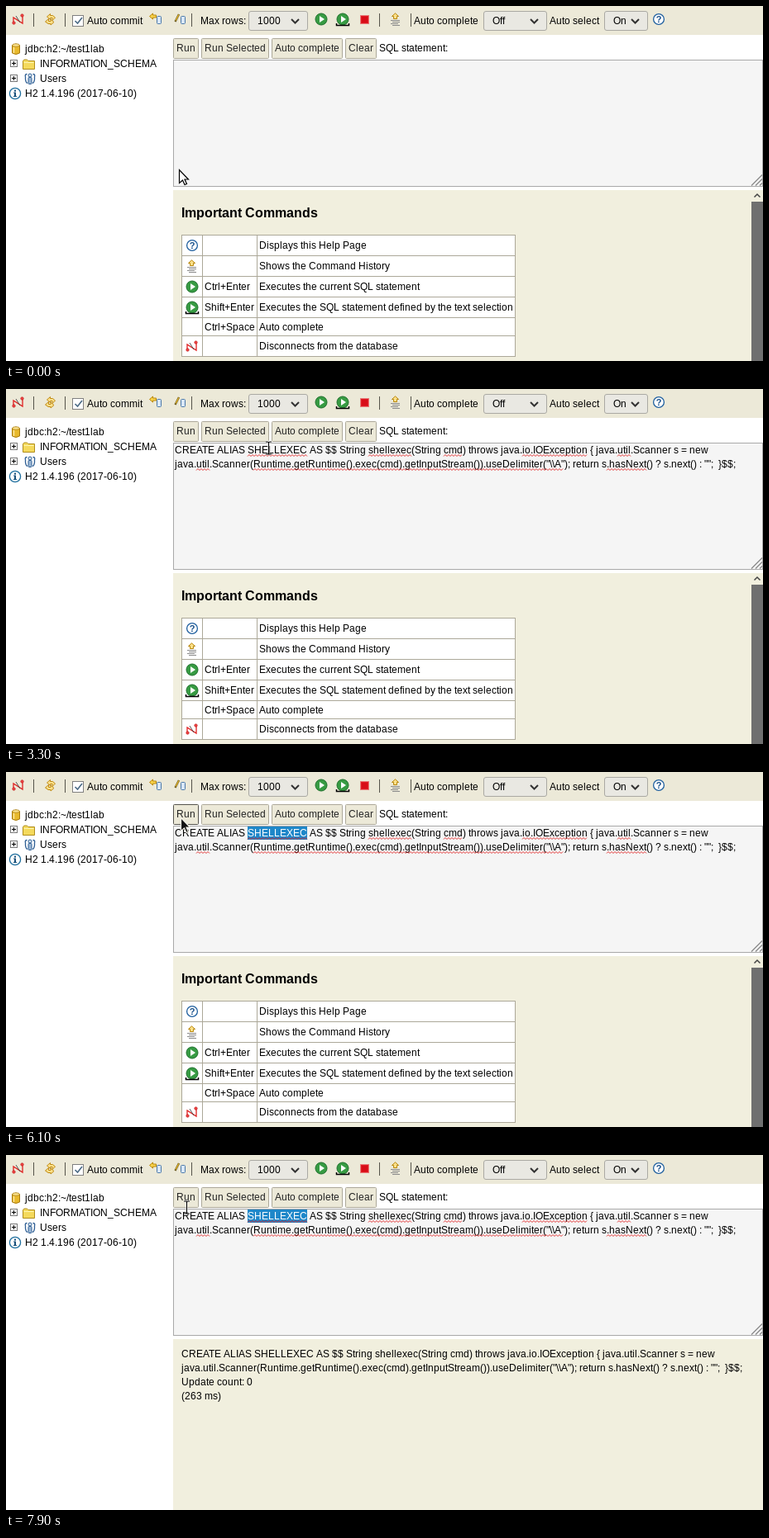
Animation of 915 by 430 pixels, one loop 8 s. Source, as an HTML page:

```html
<!DOCTYPE html>
<html lang="en">
<head>
<meta charset="utf-8">
<title>SQL console</title>
<style>
html, body { margin: 0; width: 100%; height: 100%; overflow: hidden; background: #fff; }
svg { display: block; }
text { white-space: pre; }
</style>
</head>
<body>
<svg id="stage" width="915" height="430" viewBox="0 0 915 430"></svg>
<script>
const LOOP = 8000, STEP = 100;
const BAR = '#ece9d8', PANEL = '#f1efde', EDGE = '#aca899', GOLD = '#e8b92c', BLUE = '#2f5f94';
const FAMILY = "'Liberation Sans', Arial, sans-serif";
const BODY = `12px ${FAMILY}`, TITLE = `bold 16px ${FAMILY}`, BADGE = `bold 11px ${FAMILY}`;

const measure = document.createElement('canvas').getContext('2d');
const width = s => measure.measureText(s).width;
const escapeText = s => s.replace(/&/g, '&amp;').replace(/</g, '&lt;');

// Glyph advances and kerning snap to whole pixels, like hinted screen text
function glyphPositions(x, s, font) {
  measure.font = font;
  return [...s].map((c, i) => {
    const here = x, next = s[i + 1];
    x += Math.round(width(c));
    if (next && c !== ' ' && next !== ' ') x += Math.round(width(c + next) - width(c) - width(next));
    return here;
  }).join(' ');
}
const text = (x, y, s, attrs = '', font = BODY) =>
  `<text x="${glyphPositions(x, s, font)}" y="${y}" style="font:${font}" ${attrs}>${escapeText(s)}</text>`;
const rect = (x, y, w, h, fill, attrs = '') =>
  `<rect x="${x}" y="${y}" width="${w}" height="${h}" fill="${fill}" ${attrs}/>`;
const line = (d, color, weight = 1, attrs = '') =>
  `<path d="${d}" fill="none" stroke="${color}" stroke-width="${weight}" ${attrs}/>`;
const shape = (d, fill, stroke = 'none') => `<path d="${d}" fill="${fill}" stroke="${stroke}"/>`;
const group = (id, body) => `<g id="${id}">${body}</g>`;
const at = (x, y, body) => `<g transform="translate(${x} ${y})">${body}</g>`;

// Icons are drawn in a 16 px box
const icons = {
  disconnect: line('M2 13V6L13 13V3', '#e02020', 1.3) + line('M5 4L10 12', '#555') +
    '<g fill="#f04848" stroke="#c01818" stroke-width=".7"><circle cx="2.5" cy="12.5" r="1.7"/><circle cx="12.5" cy="3.5" r="1.7"/></g>',
  refresh: shape('M7.5 1.5L3.5 5L7.5 8.5V6.5H10V9.5L13.5 6L10.5 3.5H7.5Z', '#fbe08a', '#c08a14') +
    shape('M8 15L12 11.5L8 8V10.5H5.5V7.5L1.5 11L5 13.5H8Z', '#fbe08a', '#c08a14'),
  rollback: shape('M.5 4.5L4.5 1V3H8.5V6H4.5V8Z', '#f8d34c', '#b8860b') +
    rect(9.5, 4.5, 5, 9, '#d9e7f6', 'rx="1" stroke="#4a78a8"'),
  commit: rect(9.5, 4.5, 5, 9, '#d9e7f6', 'rx="1" stroke="#4a78a8"') +
    line('M2.5 11L7 2', '#6b5a20', 2.4) + line('M3.2 9.5L6.8 2.5', GOLD, 1.2),
  run: '<circle cx="8" cy="8" r="7" fill="#379b43" stroke="#1d6f2b"/>' + shape('M6 4L12 8L6 12Z', '#fff'),
  stop: rect(3.5, 3.5, 10, 10, '#e01b24', 'stroke="#e87878"') + rect(5, 5, 7, 7, '#d80d18'),
  history: shape('M7.5 .8L11.5 4.5H9.5V7.5H5.5V4.5H3.5Z', '#fbe08a', '#b8860b') +
    line('M2 9.5H13M4 11.5H13M2 13.5H11M4 15.5H13', '#8a8a8a'),
  help: '<circle cx="8" cy="8" r="6.4" fill="#fff" stroke="#1f5f9e" stroke-width="1.3"/>' +
    text(4.7, 12, '?', 'fill="#174f8a"', BADGE),
  info: '<circle cx="8" cy="8" r="6.6" fill="#fff" stroke="#1f6f9e" stroke-width="1.3"/>' +
    rect(7, 3.6, 2, 2, '#174f7a') + shape('M6 6.5H9V11H10V12H6V11H7V7.5H6Z', '#174f7a'),
  database: shape('M3.5 3.5Q8 .5 12.5 3.5V13Q8 16 3.5 13Z', GOLD, '#a87a10') +
    '<ellipse cx="8" cy="3.5" rx="4.3" ry="1.8" fill="#f9e08a" stroke="#a87a10" stroke-width=".7"/>' +
    line('M5.5 6V13', '#fbe49a', 1.5),
  folder: shape('M1.5 13.5V3.5L3 2H6.5L8 3.5H15.5V13.5Z', '#f4d95c', '#b08d1c') +
    line('M2.5 5.5H14.5', '#fff3b0'),
  users: line('M4.5 2.5Q1.5 2.5 2.5 6V9Q3 13 5 13.5M11.5 2.5Q14.5 2.5 13.5 6V9Q13 13 11 13.5', BLUE, 1.3) +
    rect(6, 6.5, 4, 8, '#9fbad6', `rx="1" stroke="${BLUE}"`) +
    `<circle cx="8" cy="4" r="2" fill="#dbe7f3" stroke="${BLUE}"/>`,
  plus: rect(.5, .5, 8, 8, '#fff', 'stroke="#777"') + line('M2 4.5H7M4.5 2V7', '#000')
};
icons.runSelected = icons.run + line('M.5 13V15.5H15.5V13', '#000', 1.5);
const icon = (name, x, y) => at(x, y, icons[name]);

const button = (x, w, label, id = '') =>
  rect(x + .5, 39.5, w - 1, 24, BAR, `id="${id}" stroke="${EDGE}" rx="1"`) + text(x + 4, 55, label, 'fill="#222"');
const select = (x, w, label) =>
  rect(x + .5, 6.5, w - 1, 23, '#e9e8e2', 'rx="2.5" stroke="#aaa9a3"') + text(x + 11, 22, label) +
  line(`M${x + w - 20} 16l4.5 4.5l4.5 -4.5`, '#333', 2);

function toolbar() {
  const seps = [33.5, 71.5, 224.5, 451.5, 489.5].map(x => `M${x} 9V25`).join('');
  return rect(0, 0, 915, 35, BAR) + line(seps, '#55534a') +
    icon('disconnect', 7, 8) + icon('refresh', 46, 8) +
    rect(80.5, 11.5, 13, 13, '#fff', 'stroke="#808080"') + line('M83.5 18L86.5 21L92 14', '#4a6a85', 1.6) +
    text(98, 22, 'Auto commit') + icon('rollback', 173, 8) + icon('commit', 202, 8) +
    text(235, 22, 'Max rows:') + select(293, 72, '1000') +
    icon('run', 373, 8) + icon('runSelected', 399, 8) + icon('stop', 425, 8) + icon('history', 463, 8) +
    text(493, 22, 'Auto complete') + select(577, 77, 'Off') +
    text(657, 22, 'Auto select') + select(723, 53, 'On') + icon('help', 781, 8);
}

function tree() {
  return icon('database', 4, 44) + text(23, 56, 'jdbc:h2:~/test1lab') +
    icon('plus', 5, 65) + icon('folder', 19, 63) + text(41, 74, 'INFORMATION_SCHEMA') + text(41, 92, 'Users') +
    text(23, 110, 'H2 1.4.196 (2017-06-10)') +
    group('lateIcons', icon('plus', 5, 83) + icon('users', 21, 80) + icon('info', 3, 98));
}

const statement = [
  'CREATE ALIAS SHELLEXEC AS $$ String shellexec(String cmd) throws java.io.IOException { java.util.Scanner s = new',
  String.raw`java.util.Scanner(Runtime.getRuntime().exec(cmd).getInputStream()).useDelimiter("\\A"); return s.hasNext() ? s.next() : "";  }$$;`
];
const statementText = (x, y) => statement.map((s, row) => text(x, y + 17 * row, s)).join('');

function squiggle(x1, x2, y) {
  let d = `M${x1} ${y}`;
  for (let x = x1 + 2, up = true; x <= x2; x += 2, up = !up) d += `L${x} ${up ? y - 2 : y}`;
  return line(d, '#e02020', .9);
}
const squiggles = (spans, y) => spans.map(([a, b]) => squiggle(a, b, y)).join('');

function editor() {
  return button(202, 31, 'Run', 'runButton') + button(236, 82, 'Run Selected') +
    button(321, 86, 'Auto complete') + button(410, 38, 'Clear') + text(451, 55, 'SQL statement:') +
    rect(202.5, 65.5, 712, 153, '#f5f5f5', 'stroke="#a9a9a9"') +
    line('M901 217.5L914 204.5M906 217.5L914 209.5M911 217.5L914 214.5', '#888', 1.2) +
    group('statement', statementText(204, 78)) +
    group('selection', rect(292, 66, 72, 16, '#1e87c9') + text(292, 78, 'SHELLEXEC', 'fill="#fff"')) +
    group('spell1', squiggles([[292, 364], [438, 490], [529, 552], [624, 703], [739, 755]], 81.5)) +
    group('spell2', squiggles([[230, 246], [299, 674], [726, 774]], 98.5)) +
    rect(204, 67, 1, 14, '#000', 'id="caret"');
}

function helpPage() {
  const edges = [277.5, 302.5, 327.5, 352.5, 377.5, 399.5, 424.5];
  const rows = [
    ['help', '', 'Displays this Help Page'],
    ['history', '', 'Shows the Command History'],
    ['run', 'Ctrl+Enter', 'Executes the current SQL statement'],
    ['runSelected', 'Shift+Enter', 'Executes the SQL statement defined by the text selection'],
    ['', 'Ctrl+Space', 'Auto complete'],
    ['disconnect', '', 'Disconnects from the database']
  ];
  const grid = edges.map(y => `M212 ${y}H616`).join('') +
    [212.5, 237.5, 303.5, 615.5].map(x => `M${x} 277V425`).join('');
  return text(212, 256, 'Important Commands', '', TITLE) + rect(212, 277, 404, 148, '#fff') + line(grid, EDGE) +
    rows.map(([name, keys, label], i) => {
      const mid = (edges[i] + edges[i + 1]) / 2, base = Math.round(mid + 4);
      return (name ? icon(name, 217, Math.round(mid - 8)) : '') + text(240, base, keys) + text(306, base, label);
    }).join('') +
    rect(901, 237, 14, 193, '#6f6f6f') + line('M904.5 231.5L908 228L911.5 231.5', '#444', 1.5);
}

const resultPage = () => statementText(212, 245) + text(212, 279, 'Update count: 0') + text(212, 296, '(263 ms)');

function pointers() {
  const beam = 'M-3.5 -7.5H-1.5Q0 -7.5 0 -6Q0 -7.5 1.5 -7.5H3.5M0 -6V6' +
    'M-3.5 7.5H-1.5Q0 7.5 0 6Q0 7.5 1.5 7.5H3.5';
  const arrow = 'M.5 .5V16.5L4.5 13L7 18.5L9.5 17.5L7 12H11.5Z';
  return group('beam', at(.5, .5, line(beam, '#fff', 2.4, 'opacity=".8"') + line(beam, '#000', 1.1))) +
    group('arrow', `<path id="arrowShape" d="${arrow}" stroke-width="1.2"/>`);
}

document.getElementById('stage').innerHTML = rect(0, 0, 915, 430, '#fff') + toolbar() + tree() + editor() +
  rect(202, 223, 713, 207, PANEL) + group('helpPage', helpPage()) + group('resultPage', resultPage()) + pointers();

const el = id => document.getElementById(id);
const show = (id, on) => el(id).setAttribute('visibility', on ? 'visible' : 'hidden');
const between = (t, a, b) => t >= a && t < b;

// Pointer stops: time, x, y
const route = [
  [0, 209, 198], [99, 209, 198], [100, 210, 200], [500, 210, 200], [700, 225, 164], [900, 246, 117],
  [2500, 246, 117], [2700, 274, 97], [2900, 316, 65], [3000, 317, 71],
  [3800, 317, 71], [4000, 384, 66], [4200, 350, 98], [4300, 336, 102], [4400, 326, 97],
  [4500, 298, 92], [4700, 320, 90], [5000, 240, 67], [5100, 220, 59], [5200, 211, 55],
  [7800, 211, 55], [7900, 218, 63], [LOOP, 218, 63]
];
function pointerAt(t) {
  const i = route.findIndex(stop => stop[0] > t);
  const [t0, x0, y0] = route[i - 1], [t1, x1, y1] = route[i];
  const k = (t - t0) / (t1 - t0);
  return [Math.round(x0 + (x1 - x0) * k), Math.round(y0 + (y1 - y0) * k)];
}

function render(ms) {
  const t = Math.floor((ms % LOOP) / STEP) * STEP;
  const pasted = t >= 2200, hover = between(t, 5100, 7900), pressed = t === 6000;

  show('statement', pasted);
  show('spell1', pasted);
  show('spell2', t >= 2300);
  show('caret', between(t, 1100, 2300));
  el('caret').setAttribute('transform', pasted ? 'translate(678 17)' : '');
  show('selection', t >= 3500 && !pressed);
  show('helpPage', t < 6300);
  show('resultPage', t >= 6400);
  show('lateIcons', t !== 6600);

  el('runButton').setAttribute('stroke', hover ? '#55534c' : EDGE);
  el('runButton').setAttribute('fill', pressed ? '#dad7c6' : BAR);

  const [x, y] = pointerAt(t), isArrow = t < 100 || hover;
  show('arrow', isArrow);
  show('beam', !isArrow);
  el(isArrow ? 'arrow' : 'beam').setAttribute('transform', `translate(${x} ${y})`);
  el('arrowShape').setAttribute('fill', hover ? '#111' : '#fff');
  el('arrowShape').setAttribute('stroke', hover ? '#f4f2e8' : '#000');
}

const start = performance.now();
function tick() {
  render(performance.now() - start);
  requestAnimationFrame(tick);
}
tick();
</script>
</body>
</html>
```
